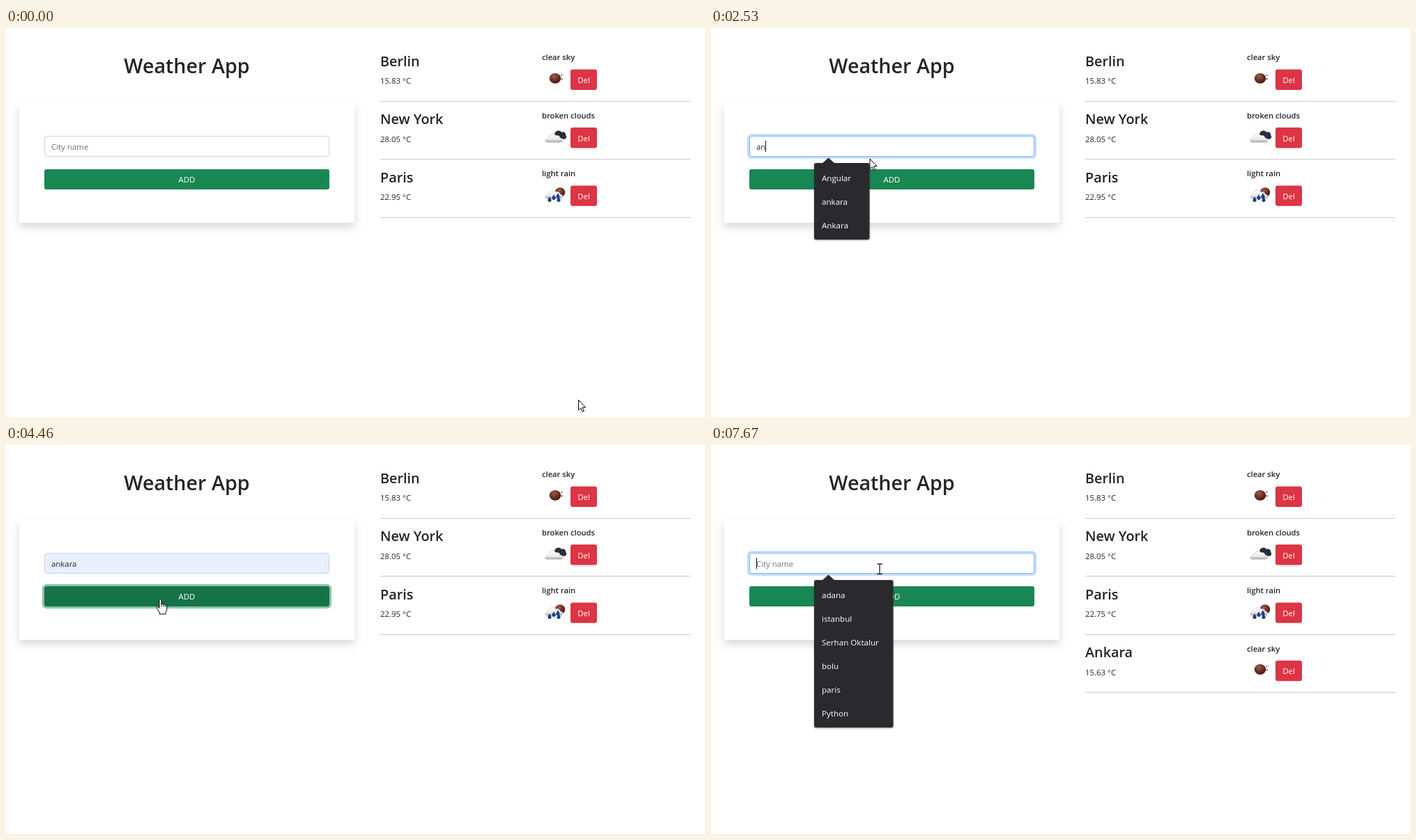
Animation, 1003 px wide and 559 px high, one loop 8000 ms. Source, as an HTML page:

```html
<!DOCTYPE html>
<html lang="en">
<head>
<meta charset="utf-8">
<title>Weather App</title>
<style>
  html, body { margin: 0; width: 100%; height: 100%; overflow: hidden; background: #fff; }
  svg { display: block; }
  text { font: 400 11.4px "Open Sans", "Noto Sans", sans-serif; fill: #212529; white-space: pre; }
  .title { font-size: 28.7px; font-weight: 600; text-anchor: middle; }
  .city { font-size: 19.8px; font-weight: 600; }
  .sky { font-size: 11.2px; font-weight: 600; }
  .mid { text-anchor: middle; fill: #fff; }
  .hint { fill: #6c757d; }
  .preview { font-size: 9.7px; fill: #000; }
  #menu text { font-size: 11.6px; fill: #fff; }
  .ring { fill: none; stroke-width: 3; }
  .pointer { fill: #fff; stroke: #000; stroke-width: 1; stroke-linejoin: round; }
</style>
</head>
<body>
<svg id="stage" width="1003" height="559" viewBox="0 0 1003 559">
  <defs>
    <filter id="cardShadow" x="-10%" y="-20%" width="120%" height="150%">
      <feDropShadow dx="0" dy="6.2" stdDeviation="6.2" flood-color="#000" flood-opacity=".15"/>
    </filter>
    <filter id="menuShadow" x="-10%" y="-10%" width="120%" height="120%">
      <feDropShadow dx="0" dy="1" stdDeviation="1.3" flood-color="#000" flood-opacity=".4"/>
    </filter>
    <radialGradient id="moonFill" cx=".4" cy=".3" r=".75">
      <stop offset="0" stop-color="#94604f"/>
      <stop offset=".5" stop-color="#6f3226"/>
      <stop offset="1" stop-color="#43140f"/>
    </radialGradient>
    <linearGradient id="cloudFill" x1="0" y1="0" x2="0" y2="1">
      <stop offset="0" stop-color="#fafafa"/>
      <stop offset=".65" stop-color="#ececec"/>
      <stop offset="1" stop-color="#a2a2a2"/>
    </linearGradient>
    <path id="cloud" d="M-11 8.5C-16 8.5-15.500 2.500-10 2.500C-9-4-2-5.500 1-1C6-2 7 1 7 2.500C12 2.500 12 8.500 8 8.500Z"
          fill="url(#cloudFill)" stroke="#c4c4c4" stroke-width=".5"/>
    <path id="drop" d="M0-4.200C1 -1.500 2.600-.5 2.600 1.200A2.600 2.600 0 0 1-2.600 1.200C-2.600-.5-1-1.500 0-4.200Z" fill="#1f3f86"/>
    <g id="clear">
      <ellipse rx="8.300" ry="7.400" fill="url(#moonFill)"/>
      <g fill="#8d7f7c"><circle cx="9.500" cy="-4.500" r="1.200"/><circle cx="9.800" cy="1" r="1.300"/></g>
    </g>
    <g id="broken">
      <path d="M-1-3C0-9 7-9.500 9-6C13-8 16-4 15-2C18 1 15 4.500 12 4L5 2Z" fill="#2a2d40"/>
      <use href="#cloud"/>
    </g>
    <g id="rain">
      <ellipse cx="7" cy="-3" rx="7.300" ry="6.800" fill="url(#moonFill)"/>
      <use href="#cloud" transform="translate(0 -2.500)"/>
      <use href="#drop" x="-8" y="7"/><use href="#drop" x="-2" y="4"/>
      <use href="#drop" x="4" y="2"/><use href="#drop" x="5" y="7"/>
    </g>
  </defs>

  <text class="title" x="259.5" y="64.500">Weather App</text>
  <rect x="19" y="107" width="481" height="173" fill="#fff" filter="url(#cardShadow)"/>

  <rect id="inputRing" class="ring" x="53.5" y="153.8" width="412" height="32.400" rx="4.500" stroke="#0d6efd" stroke-opacity=".25"/>
  <rect id="input" x="55.5" y="155.5" width="408" height="29" rx="3" stroke="#ced4da"/>
  <rect id="inputEdge" x="55.5" y="155.5" width="408" height="29" rx="3" fill="none" stroke="#86b7fe"/>
  <text id="value" x="65" y="175"></text>
  <rect id="caret" y="162" width="1" height="16" fill="#111"/>

  <rect id="addRing" class="ring" x="53.5" y="201.5" width="412" height="32" rx="4.500" stroke="#198754" stroke-opacity=".5"/>
  <rect id="add" x="55" y="203" width="409" height="29" rx="3"/>
  <text class="mid" x="259.5" y="222.300">ADD</text>

  <g id="rows"></g>
  <g id="menu"></g>

  <circle id="glow" r="11.500" fill="#fffa6a"/>
  <g id="arrow"><path class="pointer" d="M.5.5V15.200L3.800 12L6.200 17.300L8.400 16.300L6.100 11.200H10.600Z"/></g>
  <g id="beam"><path d="M-3.500-7H-1Q0-7 0-6Q0-7 1-7H3.500M-3.500 7.500H-1Q0 7.500 0 6.500Q0 7.500 1 7.500H3.500M0-6V6.500" fill="none" stroke="#222" stroke-width="1.300"/></g>
  <g id="hand">
    <path class="pointer" d="M-1.500 1.500Q-1.500 0 0 0Q1.500 0 1.500 1.500V7.500Q2.500 6 4 7.500Q5.500 6.500 6.700 8.300Q8.700 7.500 9.300 9.500V14.500Q9.300 17 7.500 19V21.500H-1V19.500L-5 13Q-5.800 11-4.200 10.700Q-3 10.500-1.500 13Z"/>
    <path d="M1.500 7V11M4.200 8V11M6.800 8.500V11.500" stroke="#000" stroke-width=".9"/>
  </g>
</svg>
<script>
  const LOOP = 8000;
  const $ = id => document.getElementById(id);
  const clamp = v => Math.max(0, Math.min(1, v));
  const show = (id, on) => { $(id).style.display = on ? "" : "none"; };
  const set = (id, name, v) => $(id).setAttribute(name, v);

  const RECENT = ["adana", "istanbul", "Serhan Oktalur", "bolu", "paris", "Python"];
  const WITH_A = ["adana", "Angular", "ankara", "Ankara", "asddasd", "asds"];
  const WITH_AN = ["Angular", "ankara", "Ankara"];

  // cursor legs: start, end, steps, target x, target y
  const HOME = [821, 534];
  const LEGS = [
    [100, 690, 7, 237, 173],
    [2530, 2730, 3, 205, 222],
    [2930, 3130, 3, 197, 245],
    [3530, 3730, 3, 211.5, 228],
    [4350, 4460, 2, 221.5, 221.5],
    [4560, 4850, 4, 531, 309],
    [5150, 5550, 5, 262, 207.5],
    [5750, 5850, 2, 258, 204.5],
    [6550, 6550, 1, 255, 200],
    [6650, 7070, 5, 242, 178]
  ];
  // click glow: start, length
  const CLICKS = [[890, 210], [3330, 100], [3830, 300], [7370, 300]];

  const ease = p => (p + p * p * (3 - 2 * p)) / 2;

  function cursorAt(t) {
    let [x, y] = HOME;
    for (const [a, b, n, tx, ty] of LEGS) {
      if (t < a) break;
      const gap = (b - a) / (n - 1) || 1;
      const p = ease(Math.min(n, Math.floor((t - a) / gap + 1e-6) + 1) / n);
      x += (tx - x) * p;
      y += (ty - y) * p;
    }
    return [x, y];
  }

  function menuAt(t) {
    if (t >= 7370 || (t >= 890 && t < 1820)) return RECENT;
    if (t >= 1820 && t < 2430) return WITH_A;
    if (t >= 2430 && t < 3430) return WITH_AN;
    return null;
  }

  function typedAt(t) {
    if (t < 1710 || t >= 6550) return "";
    return t < 2320 ? "a" : t < 3430 ? "an" : "ankara";
  }

  // focus rings grow in 100 ms steps
  const grow = (t, a) => clamp(Math.floor((t - a) / 100) * 0.75);

  function row(i, city, temp, sky, icon) {
    const y = 83.4 * i;
    return `<text class="city" x="537" y="${54.8 + y}">${city}</text>
      <text x="537" y="${80.4 + y}">${temp} °C</text>
      <text class="sky" x="769" y="${46.3 + y}">${sky}</text>
      <use href="#${icon}" x="788" y="${72.3 + y}"/>
      <rect x="810" y="${59.6 + y}" width="38" height="29.4" rx="3" fill="#dc3545"/>
      <text class="mid" x="829" y="${79.2 + y}">Del</text>
      <rect x="537" y="${Math.round(105 + y)}" width="445" height="1" fill="#c8c9ca"/>`;
  }

  function drawRows(reloaded) {
    const list = [
      ["Berlin", "15.83", "clear sky", "clear"],
      ["New York", "28.05", "broken clouds", "broken"],
      ["Paris", reloaded ? "22.75" : "22.95", "light rain", "rain"]
    ];
    if (reloaded) list.push(["Ankara", "15.63", "clear sky", "clear"]);
    $("rows").innerHTML = list.map((r, i) => row(i, ...r)).join("");
  }

  function drawMenu(items, hot) {
    if (!items) { $("menu").innerHTML = ""; return; }
    const w = items === RECENT ? 113.5 : 79.5;
    const h = items.length * 34 + 8;
    $("menu").innerHTML =
      `<g fill="#292a2d" filter="url(#menuShadow)"><rect x="148" y="194" width="${w}" height="${h}" rx="3"/>
       <path d="M159 195L168.500 186.500L178 195Z"/></g>` +
      (hot >= 0 ? `<rect x="148" y="${198 + 34 * hot}" width="${w}" height="34" fill="#3f4042"/>` : "") +
      items.map((s, i) => `<text x="159" y="${219.7 + 34 * i}">${s}</text>`).join("");
  }

  // redraw a part only when its state changes
  const last = {};
  function once(key, state, draw) {
    if (last[key] !== state) { last[key] = state; draw(); }
  }

  function render(t) {
    const [x, y] = cursorAt(t);
    const items = menuAt(t);
    const width = items === RECENT ? 113 : 79;
    const overMenu = items && x >= 148 && x < 148 + width && y >= 198 && y < 198 + 34 * items.length;
    const hot = overMenu ? Math.floor((y - 198) / 34) : -1;
    const inside = x >= 55 && x < 464 && !overMenu;
    const shape = inside && y >= 155 && y < 185 ? "beam" : inside && y >= 203 && y < 232 ? "hand" : "arrow";

    const reloaded = t >= 6550;
    once("rows", reloaded, () => drawRows(reloaded));
    once("menu", (items || "") + "|" + hot, () => drawMenu(items, hot));

    const typed = typedAt(t);
    const text = hot >= 0 ? items[hot] : typed;
    const kind = hot >= 0 ? "preview" : text ? "" : "hint";
    once("value", text + kind, () => {
      $("value").textContent = text || "City name";
      set("value", "class", kind);
    });
    set("input", "fill", hot >= 0 || typed === "ankara" ? "#e8f0fe" : "#fff");

    const caretOn = hot < 0 && ((t >= 890 && t < 1400) || (t >= 1710 && t < 3830) || t >= 7370);
    show("caret", caretOn);
    if (caretOn) set("caret", "x", text ? Math.round(65 + $("value").getComputedTextLength()) : 65);

    const focus = t < 3830 ? grow(t, 890) : t < 6550 ? 1 - grow(t, 3730) : grow(t, 7370);
    set("inputRing", "opacity", focus);
    set("inputEdge", "opacity", focus);

    const pressed = t >= 3830 && t < 6550;
    set("addRing", "opacity", pressed ? grow(t, 3730) : 0);
    set("add", "fill", pressed || shape === "hand" ? "#157347" : "#198754");

    const click = CLICKS.find(([a, d]) => t >= a && t < a + d);
    show("glow", click);
    if (click) {
      set("glow", "cx", x - 2);
      set("glow", "cy", y + 0.5);
      set("glow", "opacity", t - click[0] < 100 ? 0.85 : 0.4);
    }
    for (const id of ["arrow", "beam", "hand"]) show(id, id === shape);
    set(shape, "transform", `translate(${x} ${y})`);
  }

  let start;
  function frame(now) {
    start ??= now;
    render((now - start) % LOOP);
    requestAnimationFrame(frame);
  }
  render(0);
  requestAnimationFrame(frame);
</script>
</body>
</html>
```
